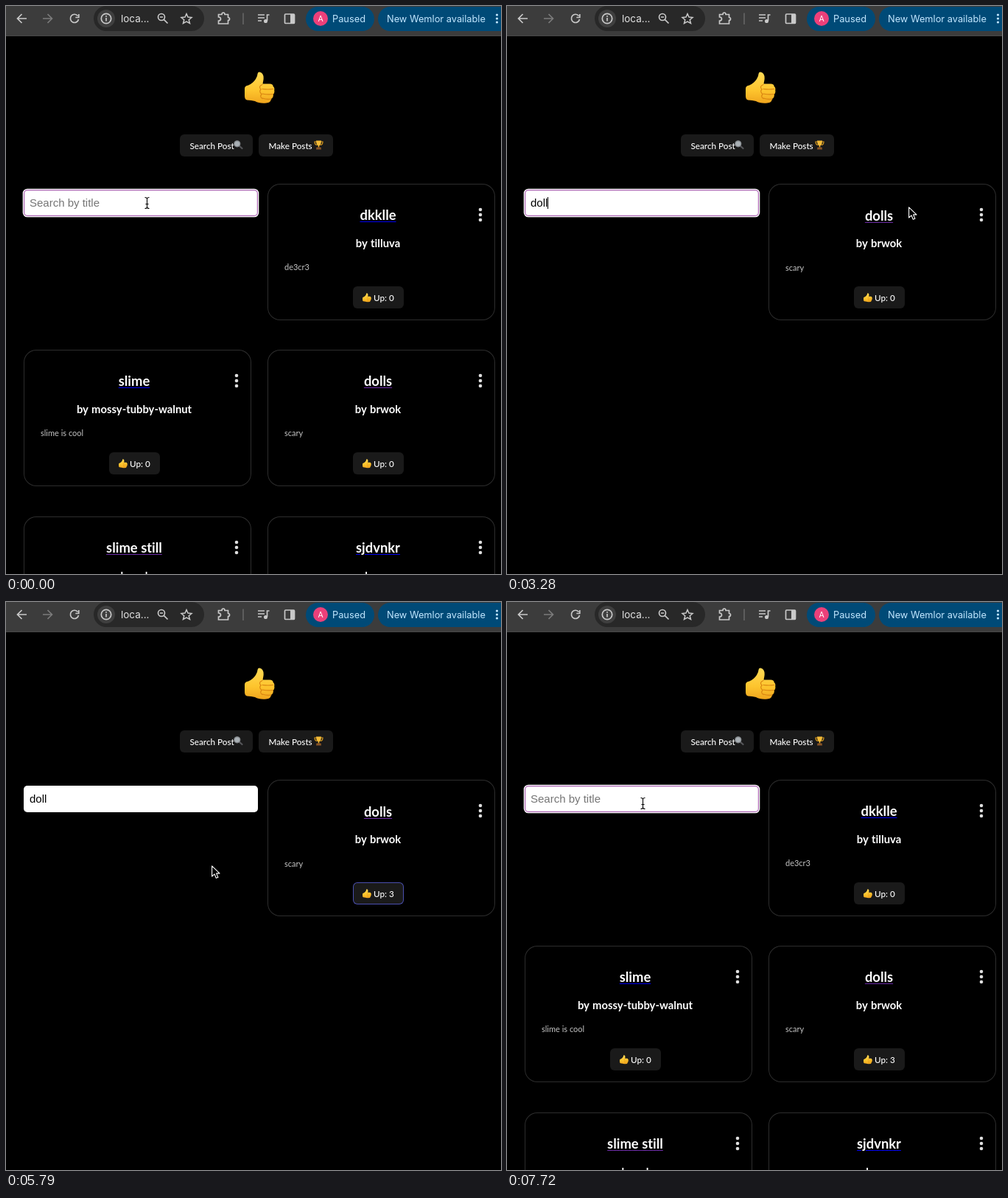
These frames come from a looping animation (672x770 px, 8 s). An HTML page:

```html
<!DOCTYPE html>
<html lang="en">
<head>
<meta charset="utf-8">
<title>Post search</title>
<style>
  html, body { margin: 0; width: 100%; height: 100%; overflow: hidden; background: #000; }
  #stage { position: relative; width: 672px; height: 770px; overflow: hidden; background: #000; color: #fff; font-family: Lato, sans-serif; font-variant-ligatures: none; }
  #stage * { position: absolute; box-sizing: border-box; white-space: pre; }
  #stage svg * { position: static; }
  svg { overflow: visible; }
  .bar { left: 0; top: 0; font-family: Inter, sans-serif; }
  .button { height: 30px; border-radius: 6px; background: #1a1a1a; font: 500 11.7px/30px Lato, sans-serif; }
  .button span { top: 0; }
  .card { width: 309px; height: 185px; border-radius: 17px; box-shadow: inset 0 0 0 1px #2d2d2d; }
  .title, .author { left: 0; width: 300px; text-align: center; font-weight: 700; }
  .title { top: 30px; font-size: 18.4px; line-height: 24px; text-decoration: underline 1.4px; text-underline-offset: 2px; }
  .author { top: 69.5px; font-size: 14.8px; line-height: 20px; word-spacing: 1px; }
  .note { left: 23px; top: 105px; font-size: 11px; line-height: 16px; color: #c4c4c4; }
  .card .button { left: 115.5px; top: 139px; width: 69px; border: 1px solid transparent; line-height: 28px; }
  .card .button span { left: 27.5px; }
  .card .button svg { left: 12.5px; top: 8px; }
  .dots { left: 286px; top: 34px; }
  #field { left: 24px; top: 249px; width: 318px; height: 36px; border-radius: 5px; background: #fff; font: 15px/36px "Liberation Sans", sans-serif; }
  #field.focus { box-shadow: 0 0 0 1.3px #fff, inset 0 0 0 1.2px #ad66b4; }
  #typed { left: 8px; top: 0; }
  #caret { top: 10px; width: 1px; height: 16px; background: #000; }
  #pointer { left: 0; top: 0; }
</style>
</head>
<body>
<div id="stage">
  <svg class="bar" width="672" height="770">
    <defs>
      <linearGradient id="skin" x2="0" y2="1">
        <stop offset="0" stop-color="#ffda55"/><stop offset=".6" stop-color="#fdc42d"/><stop offset="1" stop-color="#f0a51e"/>
      </linearGradient>
      <symbol id="thumb" viewBox="0 0 41 43">
        <path fill="url(#skin)" d="M0 23Q0 19 5 18.500Q11 16 15 10Q17.500 6 17.500 3Q18 0 21 .7Q26.500 2.500 25.500 11L24.500 16.500H34Q38.500 16.500 38.700 20Q41 22 40.200 25Q41 29 38.700 31Q39.500 35 36 37Q35.500 42 29.500 42.500Q20 43.500 14 40Q9 38.500 3 38.500Q0 37.500 0 33Z"/>
        <path fill="none" stroke="#d98512" stroke-width="1.200" stroke-linecap="round" d="M38.500 23.500Q32 24.500 24 23.500M38.500 30.500Q32 31.500 24 30M36 37Q30 38 24 36M24 17.500Q18 20 22 24Q19 27 23 30.500Q20 34 24 36.500"/>
      </symbol>
    </defs>
    <path fill="#3c3c3c" d="M0 0H672V40H0Z"/>
    <path fill="#474747" d="M0 40H672V41H0Z"/>
    <rect x="119" width="150" height="34" rx="17" fill="#282828"/>
    <circle cx="136" cy="17" r="12" fill="#3f3f3f"/>
    <g fill="none" stroke="#c9c9c9" stroke-width="1.700">
      <path d="M28 17H16M21.500 11L15.500 17L21.500 23"/>
      <path stroke="#7b7b7b" d="M50 17H62M56.500 11L62.500 17L56.500 23"/>
      <path d="M97.500 13.500A5.600 5.600 0 1 0 98.500 18M98.800 11V15.500H94.300"/>
      <circle cx="136" cy="17" r="6.700"/><path d="M136 16V20.500M136 13V14.700"/>
      <circle cx="211" cy="15" r="4.500"/><path d="M214.300 18.300L219.500 23.500M209 15H213"/>
      <path stroke-width="1.500" d="M245 10.500L247 15L252 15.500L248.200 18.700L249.500 23.500L245 21L240.500 23.500L241.800 18.700L238 15.500L243 15Z"/>
      <path d="M288.500 11.500H293Q293 9 295 9Q297 9 297 11.500H301.500V15.500Q303.500 15.500 303.500 17.500Q303.500 19.500 301.500 19.500V24H288.500V20Q291.500 20 291.500 17.500Q291.500 15 288.500 15Z"/>
      <path stroke="#686868" stroke-width="1.500" d="M322 9.500V25"/>
      <path d="M342 12H351M342 16H351M342 20H347M354.500 20V12H357.500"/>
      <circle cx="352.500" cy="20.500" r="1.700" fill="#c9c9c9"/>
      <rect x="378.500" y="11" width="13" height="12.500" rx="1"/><path fill="#c9c9c9" stroke="none" d="M386 11H392V23H386Z"/>
    </g>
    <g fill="#004a77"><rect x="407" y="1" width="93" height="33" rx="16.500"/><rect x="505" y="1" width="190" height="33" rx="16.500"/></g>
    <circle cx="427" cy="17" r="10" fill="#ec407a"/>
    <text x="427" y="21" fill="#fff" font-size="10.500" text-anchor="middle">A</text>
    <g fill="#c2e7ff" font-size="12.800">
      <text x="443" y="22">Paused</text><text x="517" y="22">New Wemlor available</text>
      <circle cx="666.500" cy="12" r="1.600"/><circle cx="666.500" cy="17" r="1.600"/><circle cx="666.500" cy="22" r="1.600"/>
    </g>
    <text x="156" y="22" fill="#e3e3e3" font-size="13.500">loca...</text>
    <use href="#thumb" x="324" y="89" width="41" height="43"/>
  </svg>

  <div class="button" style="left:236px;top:174px;width:99px"><span style="left:13.500px">Search Post</span>
    <svg style="left:73px;top:8px" width="13" height="13"><path d="M7.500 7.500L11.500 11" stroke="#55565a" stroke-width="2.200" stroke-linecap="round"/><circle cx="4.800" cy="4.800" r="4" fill="#a9b0b5" stroke="#85898d" stroke-width="1.200"/></svg>
  </div>
  <div class="button" style="left:343px;top:174px;width:101px"><span style="left:13.500px">Make Posts</span>
    <svg style="left:75px;top:8px" width="13" height="13"><path d="M3 2H1Q1 6 4 6.500M10 2H12Q12 6 9 6.500" fill="none" stroke="#d99a1f" stroke-width="1.200"/><path fill="#f4bb37" d="M3 .5H10Q10 6.500 7.200 7.500V9.500H5.800V7.500Q3 6.500 3 .5Z"/><path fill="#8a5526" d="M3.500 9.500H9.500L10 12.500H3Z"/></svg>
  </div>

  <div id="field"><span id="typed"></span><div id="caret"></div></div>
  <div id="cards"></div>

  <svg id="pointer" width="20" height="20">
    <path id="arrow" fill="#000" stroke="#fff" stroke-width="1.100" stroke-linejoin="round" d="M.6 .8V15L4 11.800L6.300 17.300L8.900 16.200L6.600 10.900H11Z"/>
    <path id="beam" fill="none" stroke="#000" stroke-width="1.100" d="M-2.500 -7.500Q.5 -7.500 .5 -5.500Q.5 -7.500 3.500 -7.500M.5 -6V6M-2.500 7.500Q.5 7.500 .5 5.500Q.5 7.500 3.500 7.500M-1.500 1.500H2.500"/>
    <path id="hand" fill="#fff" stroke="#000" stroke-width="1" stroke-linejoin="round" d="M-1.500 1Q0 -1 1.500 1V6Q3 5 4.200 6.500Q5.800 5.700 6.800 7.200Q9 6.800 9 9V13L7.500 18H0L-4.500 11Q-5 8.500 -3 9L-1.500 11Z"/>
  </svg>
</div>

<script>
const LOOP = 8000;
const BLUE = '#0000ee', PURPLE = '#6a2aa5';

const posts = [
  ['dkklle', 'tilluva', 'de3cr3', BLUE],
  ['slime', 'mossy-tubby-walnut', 'slime is cool', BLUE],
  ['dolls', 'brwok', 'scary', PURPLE],
  ['slime still', 'ud', '', PURPLE],
  ['sjdvnkr', 'vx', 'dnvk', BLUE],
  ['dragon', 'hb', '', BLUE],
  ['odd', 'kt', '', BLUE]
];
const slots = [[355, 241], [24, 466], [355, 466], [24, 692], [355, 692]];

const queries = [[0, ''], [450, 'd'], [900, 'do'], [1650, 'dol'], [1950, 'doll'], [6980, 'dol'], [7280, 'do'], [7580, 'd'], [7720, '']];
const votes = [[0, 0], [5200, 1], [5350, 2], [5640, 3]];
const hover = [[0, 0], [4760, .5], [4900, 1], [5790, .65], [5940, 0]];
const caretOn = [[150, 1350], [1650, 2400], [2840, 3430], [3880, 4320], [4760, 5200], [6390, 6830], [6980, 7720]];
const moves = [
  [0, 191, 267], [2400, 208, 259], [2550, 262, 230], [2690, 338, 217], [2840, 420, 224],
  [2980, 490, 245], [3130, 530, 264], [3280, 545, 272], [3430, 484, 258],
  [3580, 410, 234], [3730, 340, 226], [3880, 285, 232], [4030, 250, 240], [4180, 236, 244],
  [4320, 231, 245], [4470, 330, 352], [4610, 470, 441], [4760, 492, 404], [4900, 500, 396],
  [5790, 279, 357], [5940, 222, 314], [6090, 192, 288], [6240, 184, 273]
];

const $ = id => document.getElementById(id);
const at = (steps, t) => steps.findLast(step => step[0] <= t);
const inside = (x, y, left, top, right, bottom) => x > left && x < right && y > top && y < bottom;

const dots = '<svg class="dots" width="6" height="18">' +
  [1, 8, 15].map(y => `<circle cx="3" cy="${y}" r="2.3" fill="#dedede"/>`).join('') + '</svg>';

function cardHtml([title, author, note, color], [left, top], up, glow, shift) {
  return `<div class="card" style="left:${left}px;top:${top}px">
    <div style="left:0;top:${shift}px">
      <div class="title" style="text-decoration-color:${color}">${title}</div>
      <div class="author">by ${author}</div>
      <div class="note">${note}</div>
    </div>
    <div class="button" style="border-color:rgba(100,108,255,${glow})">
      <svg width="12" height="12.500"><use href="#thumb" width="12" height="12.500"/></svg><span>Up: ${up}</span>
    </div>${dots}</div>`;
}

let shown = null;
function showCards(query, up, glow) {
  const key = [query, up, glow].join();
  if (key === shown) return;
  shown = key;
  const found = posts.filter(post => post[0].includes(query));
  const shift = found.length === 1 ? .6 : 0;
  $('cards').innerHTML = slots.slice(0, found.length).map((slot, i) => {
    const dolls = found[i][0] === 'dolls';
    return cardHtml(found[i], slot, dolls ? up : 0, dolls ? glow : 0, shift);
  }).join('');
}

function showPointer(t) {
  const [, x, y] = at(moves, t);
  const kind = inside(x, y, 24, 249, 342, 285) ? 'beam' : inside(x, y, 470, 380, 540, 410) ? 'hand' : 'arrow';
  for (const id of ['arrow', 'beam', 'hand']) $(id).style.display = id === kind ? '' : 'none';
  $('pointer').style.transform = `translate(${x}px,${y}px)`;
}

function draw(now) {
  const t = now % LOOP;
  const query = at(queries, t)[1];
  showCards(query, at(votes, t)[1], at(hover, t)[1]);
  $('field').className = t < 5200 || t >= 6390 ? 'focus' : '';
  $('typed').textContent = query || 'Search by title';
  $('typed').style.color = query ? '#000' : '#757575';
  $('caret').style.left = 8 + (query ? $('typed').offsetWidth : 0) + 'px';
  $('caret').style.display = caretOn.some(([from, to]) => t >= from && t < to) ? '' : 'none';
  showPointer(t);
}

const start = performance.now();
function tick() {
  draw(performance.now() - start);
  requestAnimationFrame(tick);
}
tick();
</script>
</body>
</html>
```
